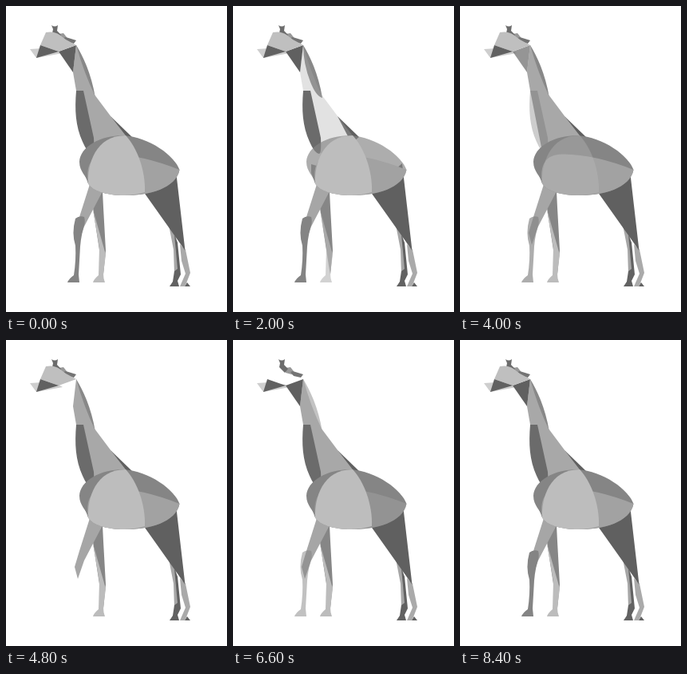
Recreate the animation shown at these times as an HTML page. Size 277 by 383 pixels, loop 8.6 s.

```html
<!DOCTYPE html>
<html lang="en">
<head>
<meta charset="utf-8">
<title>Giraffe</title>
<style>
html, body { margin: 0; height: 100%; overflow: hidden; background: #fff; }
svg { display: block; width: 100%; height: 100%; }
</style>
</head>
<body>
<svg id="stage" viewBox="0 0 277 383"></svg>
<script>
const STEP = 200, STEPS_PER_KEY = 6, STEPS = 43;

// Back to front: [fill, path, keys at which the shape is invisible]
const shapes = [
  // hind legs
  ["#a6a6a6", "M204 274L213 288L217 330L211 335L210 305Z"],
  ["#626262", "M211 286L215 296L219 336L215 344L217 351H205L209 345L211 332L215 329Z"],
  ["#aaa", "M218 298L225 305L231 334L226 347L224 351H218L225 335L220 319Z"],
  ["#626262", "M227 346L231 351H224Z"],
  ["#606060", "M172 232L212 197L214 215L224.5 306Z"],
  // front legs
  ["#868686", "M98 198L112 202L121 232L122 252L125 306L122 336L120 325L109 253L110 222H103L98 209Z"],
  ["#bcbcbc", "M109 255L125 311L122 335Q122 341 124 346H109Q110 342 116 337L117 303Z", [1]],
  ["#a6a6a6", "M106 220L121 232L109 255L98 276L90 299L86 284L92 264Z"],
  ["#848484", "M87 266Q92 262 98 264Q100 270 97 278Q93 292 92.5 310L91 336L92 346H77Q79 341 85 337Q88 318 87 300Q82 284 87 266Z", [4, 6]],
  // neck
  ["#606060", "M131 138L158 164L153 168L144 163Z"],
  ["#888", "M88 49C96 62 107 84 112 115Q104 113 97 95Q88 72 88 49Z", [5]],
  ["#a8a8a8", "M88 49Q97.5 83 111 111L132 139L153 166L130 190L103 182L88 106L84 83Z", [2]],
  ["#6b6b6b", "M88 106H97L110 165Q111 184 108 185Q102 184 96 170C87 150 86 130 88 106Z", [3]],
  // body
  ["#858585", "M92 195C93 176 118 162 147 162C180 164 212 188 217.5 205C213 228 180 237 150 237C125 237 108 231 103 222C101 212 92 208 92 195Z", [1]],
  ["#a2a2a2", "M103 222C100 200 106 185 130 185.5Q170 186 217.5 205C213 228 180 237 150 237C125 237 108 231 103 222Z", [6]],
  ["#bdbdbd", "M150 162C164 177 175 205 174 233Q160 237 148 237C125 237 108 231 103 222C102 198 112 162 150 162Z", [3]],
  // head
  ["#cecece", "M30 54L45 53L66 56L71 59L38 65Z"],
  ["#606060", "M66 57L88 49L84 83Z", [4]],
  ["#989898", "M66 35L72 34L76 39L77 44L66 41Z"],
  ["#6c6c6c", "M57 24Q61 27 65 24L64 31L69 36L65 41L58 34L59 29Z"],
  ["#747474", "M75 39L88 43L85 47L76 45L72 40Z"],
  ["#bfbfbf", "M50 33Q60 31 67 36L75 42L88 49L66 57L43 49Z", [5, 6]],
  ["#616161", "M43 49L66 57L38 65Z"],
];

const stage = document.getElementById("stage");
const fading = [];
for (const [fill, d, hidden] of shapes) {
  const path = document.createElementNS("http://www.w3.org/2000/svg", "path");
  path.setAttribute("d", d);
  path.setAttribute("fill", fill);
  stage.append(path);
  if (hidden) fading.push({ path, hidden });
}

function draw(now) {
  const pos = Math.floor(now / STEP) % STEPS / STEPS_PER_KEY;
  const key = Math.floor(pos), part = pos - key;
  for (const { path, hidden } of fading) {
    const at = k => hidden.includes(k) ? 0 : 1;
    path.style.opacity = at(key) * (1 - part) + at(key + 1) * part;
  }
}

const start = performance.now();
function tick() {
  draw(performance.now() - start);
  requestAnimationFrame(tick);
}
tick();
</script>
</body>
</html>
```
